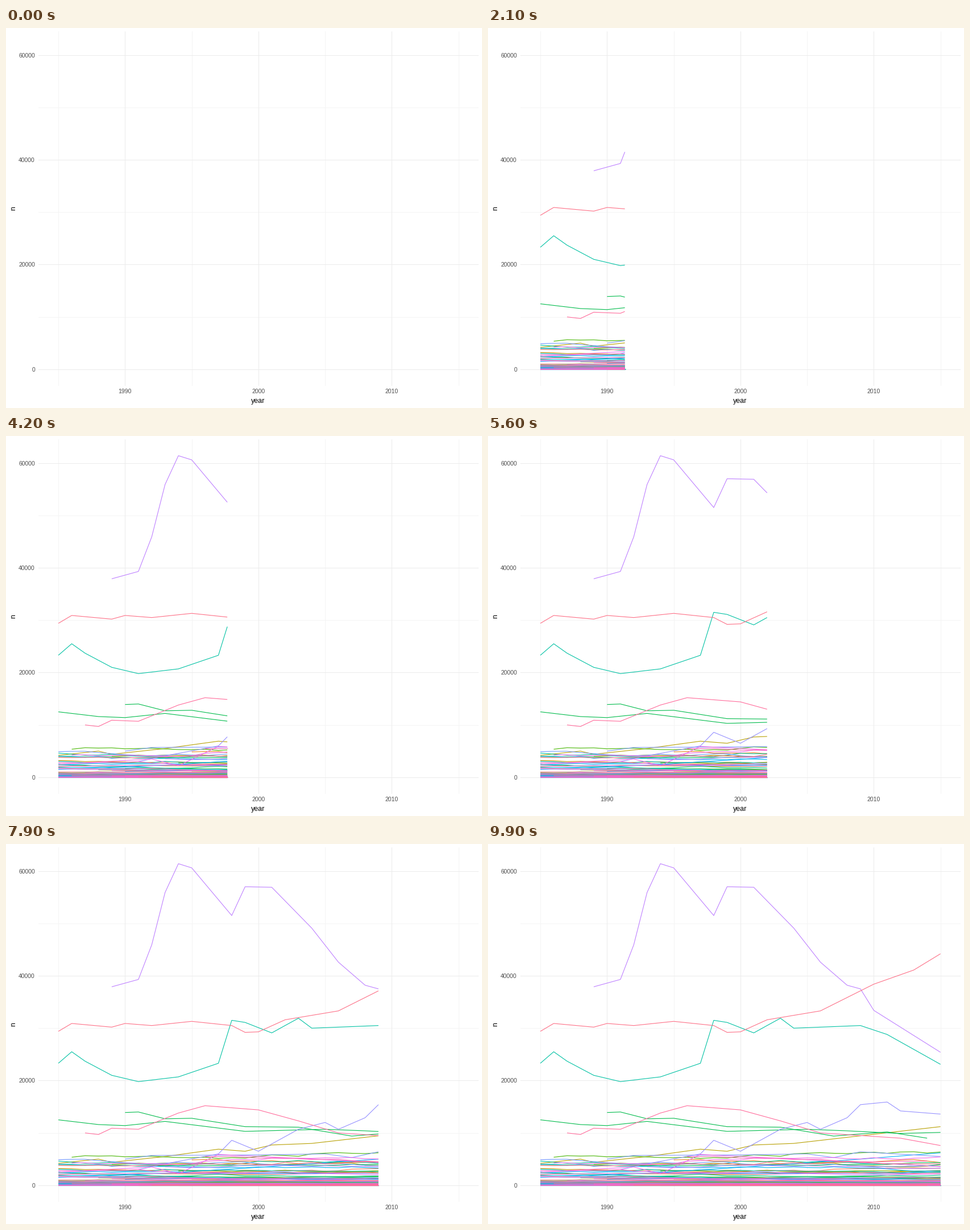
Recreate the animation shown at these times as a matplotlib script. Size 837 by 669 pixels, loop 10 s.

```python
import matplotlib.pyplot as plt
import numpy as np
from matplotlib.animation import FuncAnimation
from matplotlib.collections import LineCollection

W, H, DPI = 837, 669, 64
PT = 72 / DPI  # points per pixel
FIRST, LAST, FRAMES = 1985, 2015, 100
SMALL, TOP = 85, 56  # count and highest level of the minor series

rng = np.random.default_rng(11)
lines = []


def px(year):
    return 92.1 + 23.45 * (year - FIRST)


def py(n):
    return 600.9 - 0.009222 * n


def hcl(hue, c=100, lum=65):
    """Polar LUV to sRGB."""
    t = np.radians(hue)
    u = c * np.cos(t) / (13 * lum) + 0.19784
    v = c * np.sin(t) / (13 * lum) + 0.46834
    y = ((lum + 16) / 116) ** 3
    x = 9 * y * u / (4 * v)
    z = -x / 3 - 5 * y + 3 * y / v
    rgb = np.array([3.2405 * x - 1.5371 * y - 0.4985 * z,
                    -0.9693 * x + 1.8760 * y + 0.0416 * z,
                    0.0556 * x - 0.2040 * y + 1.0572 * z])
    rgb = np.clip(rgb, 0, 1)
    rgb = np.where(rgb > 0.0031308, 1.055 * rgb ** (1 / 2.4) - 0.055, 12.92 * rgb)
    return tuple(np.clip(rgb, 0, 1))


def add(hue, years, hundreds):
    """Store a series; each year is reached on a whole tick."""
    ticks = np.round((FRAMES - 1) * (years - FIRST) / (LAST - FIRST))
    lines.append((hue, ticks, px(years), py(100 * hundreds)))


def trend(hue, *points):
    """Straight runs through (year, hundreds) turning points."""
    at, val = np.transpose(points)
    years = np.arange(at[0], at[-1] + 1)
    add(hue, years, np.interp(years, at, val))


# Leading series
trend(5, (1985, 294), (1986, 309), (1989, 302), (1990, 309), (1992, 305),
      (1995, 313), (1998, 305), (1999, 292), (2000, 293), (2002, 316),
      (2006, 333), (2010, 384), (2013, 411), (2015, 442))
trend(177, (1985, 233), (1986, 255), (1987, 237), (1989, 210), (1991, 198),
      (1994, 207), (1997, 233), (1998, 315), (1999, 311), (2001, 291),
      (2003, 319), (2004, 300), (2009, 305), (2011, 288), (2015, 231))
trend(281, (1989, 379), (1991, 393), (1992, 459), (1993, 559), (1994, 614),
      (1995, 606), (1998, 515), (1999, 570), (2001, 569), (2004, 491),
      (2006, 426), (2008, 382), (2009, 375), (2010, 334), (2015, 254))
trend(356, (1987, 100), (1988, 97), (1989, 109), (1991, 107), (1994, 138),
      (1996, 152), (2000, 144), (2003, 123), (2006, 100), (2012, 90), (2015, 76))
trend(140, (1985, 125), (1988, 116), (1990, 114), (1993, 122), (1999, 103),
      (2005, 107), (2008, 104), (2012, 99), (2015, 101))
trend(140, (1990, 139), (1991, 140), (1993, 127), (1995, 128), (1999, 112),
      (2003, 111), (2007, 94), (2011, 102), (2014, 90))
trend(75, (1985, 42), (1988, 50), (1989, 44), (1993, 55), (1997, 69),
      (1999, 65), (2001, 77), (2004, 80), (2015, 112))
trend(267, (1991, 30), (1993, 41), (1997, 60), (1998, 86), (2000, 65),
      (2003, 107), (2005, 120), (2006, 107), (2008, 129), (2009, 154),
      (2011, 159), (2012, 142), (2015, 136))
trend(260, (1990, 50), (1992, 57), (2000, 58), (2005, 60), (2007, 53),
      (2009, 64), (2015, 55))
trend(235, (1985, 15), (1993, 23), (2001, 36), (2009, 50), (2015, 62))
trend(312, (1985, 25), (1992, 35), (1994, 22), (1997, 59), (2015, 36))

# Minor series: crowded near zero, hues spread by the golden ratio
for i in range(SMALL):
    level = TOP * ((i + 1) / SMALL) ** 4
    late = rng.random() < 0.35
    start = FIRST + (int(rng.integers(1, 12)) if late else 0)
    step = 2 if i % 9 == 3 else 1  # some are counted every other year
    years = np.arange(start, LAST + 1, step)
    drift = np.cumsum(rng.normal(-0.004, 0.035, len(years)))
    add(15 + 360 * (i * 0.618 % 1), years, level * np.exp(drift))

lines.sort(key=lambda s: (s[0] - 15) % 360)

fig = plt.figure(figsize=(W / DPI, H / DPI), dpi=DPI, facecolor="white")
ax = fig.add_axes([0, 0, 1, 1])
ax.set(xlim=(0, W), ylim=(H, 0))
ax.axis("off")


def grid(years, counts, color):
    for y in years:
        ax.plot([px(y)] * 2, [6, 628.5], color=color, lw=PT, zorder=1)
    for n in counts:
        ax.plot([57, 830.5], [py(n)] * 2, color=color, lw=PT, zorder=1)


def label(x, y, s, size=10.4, color="#4d4d4d", **kw):
    kw = {"ha": "center", "va": "baseline", **kw}
    ax.text(x, y, s, fontsize=size * PT, color=color, family="Liberation Sans", **kw)


grid(range(1985, 2016, 10), range(10000, 60000, 20000), "#f4f4f4")
grid(range(1990, 2011, 10), range(0, 60001, 20000), "#ebebeb")
for year in range(1990, 2011, 10):
    label(px(year), 643.3, str(year))
for n in range(0, 60001, 20000):
    label(51, py(n) + 4, str(n), ha="right")
label(443.5, 659.8, "year", 12.5, "black")
label(13, 317.5, "n", 12.5, "black", va="center", rotation=90)

curves = LineCollection([], colors=[hcl(s[0]) for s in lines],
                        linewidths=1.1 * PT, zorder=2)
ax.add_collection(curves, autolim=False)


def reveal(k, ticks, x, y):
    past = ticks < k
    if not past.any():
        return np.full((2, 2), np.nan)
    head = np.interp(k, ticks, x), np.interp(k, ticks, y)
    return np.vstack([np.column_stack([x[past], y[past]]), head])


def update(k):
    curves.set_segments([reveal(k, *s[1:]) for s in lines])
    return [curves]


anim = FuncAnimation(fig, update, frames=FRAMES, interval=100,
                     repeat=True, repeat_delay=0, blit=False)
plt.show()
```
